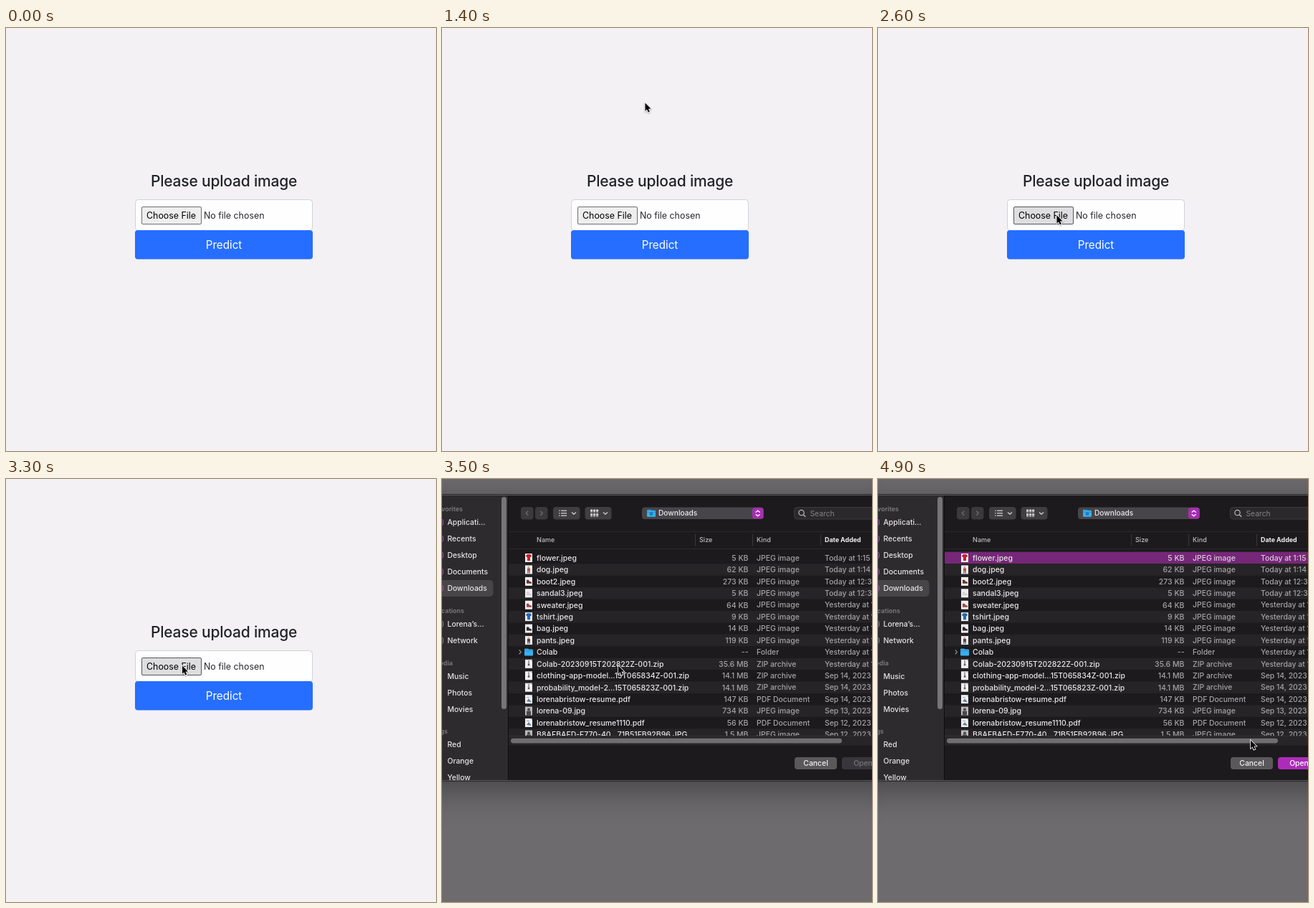
These frames come from a looping animation (600x590 px, 5000 ms). An HTML page with a canvas:

```html
<!DOCTYPE html>
<html lang="en">
<head>
<meta charset="utf-8">
<title>Upload an image</title>
<style>
  html, body { margin: 0; width: 100%; height: 100%; overflow: hidden; background: #f3f1f4; }
  canvas { display: block; width: 600px; height: 590px; }
</style>
</head>
<body>
<canvas id="stage" width="600" height="590"></canvas>
<script>
const ctx = document.getElementById('stage').getContext('2d');
const LOOP = 5000, STEP = 100;
const HOVER_AT = 2300, SHEET_AT = 3400, SETTLED_AT = 3500, SELECT_AT = 4600;
const SHEET_TOP = 22, SHEET_BOTTOM = 421;

// Cursor keys: time, x, y of the tip
const cursorPath = [
  [500, -3, 160], [750, 38, 136], [1000, 99, 117], [1200, 190, 107], [1400, 283, 104],
  [1600, 341, 121], [1800, 359, 170], [2000, 334, 232], [2200, 259, 258], [2500, 250, 261],
  [2900, 246, 260], [3100, 245.5, 260], [3800, 245.5, 260], [4100, 206, 175],
  [4400, 178, 107], [4600, 178, 107], [4750, 350, 240], [4900, 519.5, 364], [5000, 519.5, 364]
];

const files = [
  ['flower.jpeg', '5 KB', 'JPEG image', 'Today at 1:15 PM', 'shirt', '#c8202b'],
  ['dog.jpeg', '62 KB', 'JPEG image', 'Today at 1:14 PM', 'figure', '#b5533f'],
  ['boot2.jpeg', '273 KB', 'JPEG image', 'Today at 12:38 PM', 'shoe', '#6d3528'],
  ['sandal3.jpeg', '5 KB', 'JPEG image', 'Today at 12:36 PM', 'shoe', '#d4d2d5'],
  ['sweater.jpeg', '64 KB', 'JPEG image', 'Yesterday at 11:40 PM', 'shoe', '#a04a4a'],
  ['tshirt.jpeg', '9 KB', 'JPEG image', 'Yesterday at 11:38 PM', 'shirt', '#2268b4'],
  ['bag.jpeg', '14 KB', 'JPEG image', 'Yesterday at 11:36 PM', 'shoe', '#2a2830'],
  ['pants.jpeg', '119 KB', 'JPEG image', 'Yesterday at 11:34 PM', 'figure', '#50414d'],
  ['Colab', '--', 'Folder', 'Yesterday at 1:29 PM', 'folder'],
  ['Colab-20230915T202822Z-001.zip', '35.6 MB', 'ZIP archive', 'Yesterday at 1:28 PM', 'zip'],
  ['clothing-app-model…15T065834Z-001.zip', '14.1 MB', 'ZIP archive', 'Sep 14, 2023', 'zip'],
  ['probability_model-2…15T065823Z-001.zip', '14.1 MB', 'ZIP archive', 'Sep 14, 2023', 'zip'],
  ['lorenabristow-resume.pdf', '147 KB', 'PDF Document', 'Sep 14, 2023', 'pdf'],
  ['lorena-09.jpg', '734 KB', 'JPEG image', 'Sep 13, 2023', 'portrait'],
  ['lorenabristow_resume1110.pdf', '56 KB', 'PDF Document', 'Sep 12, 2023', 'pdf'],
  ['B8AFBAFD-F770-40…71B51FB92B96.JPG', '1.5 MB', 'JPEG image', 'Sep 12, 2023', 'portrait']
];

const sidebar = [
  ['Favorites', 42, 29, ['Applicati…', 'Recents', 'Desktop', 'Documents', 'Downloads']],
  ['Locations', 184, 31, ['Lorena’s…', 'Network']],
  ['Media', 256.5, 15, ['Music', 'Photos', 'Movies']],
  ['Tags', 352, 8, ['Red', 'Orange', 'Yellow', 'Green']]
];

function text(str, x, y, size, color, { weight = 500, align = 'left', tracking = 0 } = {}) {
  ctx.font = `${weight} ${size}px Inter, sans-serif`;
  ctx.letterSpacing = tracking + 'px';
  ctx.textAlign = align;
  ctx.fillStyle = color;
  ctx.fillText(str, x, y + size * 0.36);
}

function rect(x, y, w, h, color) {
  ctx.fillStyle = color;
  ctx.fillRect(x, y, w, h);
}

function box(x, y, w, h, r, fill, stroke) {
  ctx.beginPath();
  ctx.roundRect(x, y, w, h, r);
  ctx.fillStyle = fill;
  ctx.fill();
  if (stroke) {
    ctx.lineWidth = 1;
    ctx.strokeStyle = stroke;
    ctx.stroke();
  }
}

function line(points, color, width = 1) {
  ctx.beginPath();
  points.forEach(([x, y]) => ctx.lineTo(x, y));
  ctx.lineWidth = width;
  ctx.strokeStyle = color;
  ctx.stroke();
}

function shape(points, color) {
  ctx.beginPath();
  points.forEach(([x, y]) => ctx.lineTo(x, y));
  ctx.closePath();
  ctx.fillStyle = color;
  ctx.fill();
}

// Chevron centred on x, y; (dx, dy) points from the centre to the tip
function chevron(x, y, dx, dy, color, width = 1.3) {
  const sx = dy ? 3 : 0, sy = dx ? 3 : 0;
  line([[x - dx - sx, y - dy - sy], [x + dx, y + dy], [x - dx + sx, y - dy + sy]], color, width);
}

function drawPage(hover) {
  rect(0, 0, 600, 590, '#f3f1f4');
  text('Please upload image', 304, 213, 21, '#212327', { align: 'center', tracking: -0.2 });
  box(180.5, 239.5, 247, 43, 4, '#fefdff', '#d0d2d8');
  box(189.5, 249.5, 83, 24, 1.5, hover ? '#dedddf' : '#efeeef', hover ? '#565557' : '#6f6e70');
  text('Choose File', 196, 261.3, 12.4, '#000', { weight: 400 });
  text('No file chosen', 276, 261.3, 12.4, '#26282c', { weight: 400 });
  box(180, 282, 248, 40.5, 4, '#266eff');
  text('Predict', 304, 302.5, 15.2, '#fff', { weight: 400, align: 'center' });
}

function drawFolder(x, y) {
  box(x, y - 5, 6, 4, 1, '#2a9ad8');
  box(x, y - 4, 12, 9, 1.2, '#38b1ee');
  rect(x, y - 2, 12, 0.8, '#2689c5');
}

function drawIcon(kind, y, color) {
  if (kind === 'folder') {
    chevron(109, y, 1.4, 0, '#9a989b', 1.1);
    drawFolder(115, y);
    return;
  }
  rect(116, y - 6, 10, 12, kind === 'portrait' ? '#bcb9bc' : '#f1eff2');
  if (kind === 'shirt') {
    shape([[117, y - 3], [119, y - 5], [123, y - 5], [125, y - 3], [124, y - 1],
      [123, y - 1], [123, y + 4], [119, y + 4], [119, y - 1], [118, y - 1]], color);
  } else if (kind === 'figure') {
    rect(119.5, y - 4.5, 2.5, 2.5, '#d8a58c');
    rect(119, y - 2, 4, 4, color);
    rect(119.3, y + 2, 1.2, 3, '#55404a');
    rect(121.5, y + 2, 1.2, 3, '#55404a');
  } else if (kind === 'shoe') {
    shape([[118, y - 2], [121, y - 2], [122, y], [125, y + 1], [125, y + 3], [118, y + 3]], color);
  } else if (kind === 'portrait') {
    ctx.beginPath();
    ctx.arc(121, y - 2, 2, 0, 7);
    ctx.fillStyle = '#4c474b';
    ctx.fill();
    rect(118, y, 6, 6, '#4c474b');
  } else {
    shape([[123, y - 6], [126, y - 6], [126, y - 3]], '#b9b7ba');
    if (kind === 'zip') {
      rect(120.4, y - 5, 1.3, 6, '#7b797c');
      rect(119.8, y, 2.5, 2.5, '#5e5c5f');
    } else {
      rect(118, y - 3, 4, 1, '#aaa8ab');
      shape([[118, y + 3], [121, y - 1], [125, y + 4]], '#5b7fb0');
    }
  }
}

function drawSidebar(settled) {
  rect(0, SHEET_TOP, 92, SHEET_BOTTOM - SHEET_TOP, '#2d2b2e');
  box(-10, 141, 81.5, 23, 5, '#474548');
  sidebar.forEach(([title, top, right, items], group) => {
    const shift = !settled && group > 1 ? -23 : 0;
    text(title, right, top + shift, 9, '#7f7d80', { weight: 600, align: 'right' });
    items.forEach((name, i) => {
      if (name === 'Network' && !settled) return;
      const y = top + shift + 18.3 + i * 23;
      if (group < 2) box(-8, y - 4, 9.5, 8, 2, 'transparent', group ? '#8d8b8e' : '#b04bbd');
      text(name, 7.5, y, 10.4, '#e6e4e7');
    });
  });
  const top = settled ? 25 : 23, bottom = settled ? 321 : 334;
  box(83, top, 7, bottom - top, 3.5, '#767477');
  rect(92, SHEET_TOP, 1, SHEET_BOTTOM - SHEET_TOP, '#0d0c0e');
}

function drawToolbar() {
  for (const [x, dx] of [[110, -1.5], [130, 1.5]]) {
    box(x, 39, 17.5, 17.5, 4, '#3b393c');
    chevron(x + 8.7, 47.7, dx, 0, '#6d6b6e');
  }
  box(155, 39, 37.5, 17.5, 4, '#403e41');
  box(199.5, 39, 37, 17.5, 4, '#403e41');
  for (let i = 0; i < 3; i++) {
    const y = 44.2 + i * 3.4;
    rect(163, y - 0.6, 1.5, 1.3, '#cfcdd0');
    rect(166, y - 0.6, 8, 1.3, '#cfcdd0');
    for (const row of [42.5, 48.2]) {
      box(207 + i * 4, row, 3.2, 3.2, 0.6, '#cfcdd0');
      rect(207 + i * 4, row + 3.9, 3.2, 0.9, '#a3a1a4');
    }
  }
  chevron(184, 47.8, 0, 1.3, '#cfcdd0');
  chevron(228, 47.8, 0, 1.3, '#cfcdd0');

  box(279, 39.5, 170, 16.5, 4, '#474549');
  drawFolder(286, 47.8);
  box(289.5, 46, 5, 5, 2.5, '#1c7fbd');
  text('Downloads', 302, 47.7, 10.2, '#eceaed');
  box(433, 40, 15.5, 15.5, 4, '#a62eb1');
  chevron(440.7, 45.2, 0, -1.2, '#fff');
  chevron(440.7, 50.4, 0, 1.2, '#fff');

  box(491.5, 39.5, 120, 16.5, 4, '#2b292c', '#3d3b3e');
  ctx.beginPath();
  ctx.arc(501.5, 47, 3.7, 0, 7);
  ctx.lineWidth = 1.2;
  ctx.strokeStyle = '#bdbbbe';
  ctx.stroke();
  line([[504.2, 49.7], [507.3, 52.8]], '#bdbbbe', 1.3);
  text('Search', 513.5, 47.8, 10.3, '#858386', { weight: 400 });
}

function drawList(selected) {
  rect(93, 73, 507, 1, '#2b292c');
  text('Name', 132, 85, 9.1, '#bfbdc0');
  text('Size', 359, 85, 9.1, '#bfbdc0');
  text('Kind', 439, 85, 9.1, '#bfbdc0');
  text('Date Added', 534, 85, 8.9, '#f1eff2', { weight: 700 });
  for (const x of [353, 433, 528]) rect(x, 77, 1, 16, '#39373a');
  rect(93, 97, 507, 1, '#2b292c');

  ctx.save();
  ctx.beginPath();
  ctx.rect(93, 98, 507, 260);
  ctx.clip();
  files.forEach(([name, size, kind, date, icon, color], i) => {
    const y = 110 + i * 16.43, active = selected && !i;
    if (active) rect(93, y - 8.3, 507, 16.4, '#752877');
    else if (i % 2) rect(93, y - 8.2, 507, 16.43, '#262427');
    const muted = active ? '#dccade' : '#a5a3a6';
    drawIcon(icon, y, color);
    text(name, 132, y, 10.5, '#e9e7ea');
    text(size, 427.5, y, 10.5, muted, { align: 'right' });
    text(kind, 439, y, 10.4, muted);
    text(date, 534, y, 10.4, muted);
  });
  ctx.restore();

  rect(93, 358, 507, 13.5, '#272528');
  rect(93, 358, 507, 1, '#353336');
  box(96, 361.7, 462, 6.8, 3.4, '#706e71');
}

function drawSheet(settled, selected) {
  rect(0, 0, 600, 590, settled ? '#6d6b6e' : '#919092');
  ctx.save();
  ctx.translate(0, settled ? 0 : -5);
  ctx.shadowColor = 'rgba(0,0,0,.4)';
  ctx.shadowBlur = 44;
  ctx.shadowOffsetY = 12;
  rect(-60, SHEET_TOP, 720, SHEET_BOTTOM - SHEET_TOP, '#1c1a1d');
  ctx.shadowColor = 'transparent';

  ctx.save();
  ctx.beginPath();
  ctx.rect(0, SHEET_TOP, 600, SHEET_BOTTOM - SHEET_TOP);
  ctx.clip();
  drawSidebar(settled);
  drawToolbar();
  drawList(selected);
  box(492, 388, 59, 17, 4, '#5a585b');
  text('Cancel', 521.5, 396.3, 10.4, '#f1eff2', { align: 'center' });
  box(558, 388, 59, 17, 4, selected ? '#ad2bb9' : '#38363a');
  text('Open', 587.5, 396.3, 10.4, selected ? '#fff' : '#767477', { align: 'center' });
  ctx.restore();

  // Light inner edge with a dark outer outline
  rect(0, SHEET_TOP - 1, 600, 1, '#29272a');
  rect(0, SHEET_TOP, 600, 1, '#59575a');
  rect(0, SHEET_BOTTOM - 1, 600, 1, '#59575a');
  rect(0, SHEET_BOTTOM, 600, 1, '#29272a');
  ctx.restore();
}

function cursorAt(t) {
  const i = cursorPath.findIndex(key => key[0] > t);
  const [t0, x0, y0] = cursorPath[i - 1], [t1, x1, y1] = cursorPath[i];
  const k = (t - t0) / (t1 - t0);
  return [x0 + (x1 - x0) * k, y0 + (y1 - y0) * k];
}

function drawCursor(x, y) {
  ctx.save();
  ctx.translate(x, y);
  ctx.beginPath();
  for (const [px, py] of [[0.5, 0.5], [0.5, 11.7], [3, 9.4], [4.8, 13.6],
    [6.8, 12.8], [5, 8.7], [8.5, 8.5]]) ctx.lineTo(px, py);
  ctx.closePath();
  ctx.shadowColor = 'rgba(0,0,0,.35)';
  ctx.shadowBlur = 2;
  ctx.shadowOffsetY = 1;
  ctx.lineWidth = 1.6;
  ctx.strokeStyle = '#fff';
  ctx.stroke();
  ctx.shadowColor = 'transparent';
  ctx.fillStyle = '#000';
  ctx.fill();
  ctx.restore();
}

function draw(t) {
  if (t < SHEET_AT) drawPage(t >= HOVER_AT);
  else drawSheet(t >= SETTLED_AT, t >= SELECT_AT);
  if (t >= cursorPath[0][0]) drawCursor(...cursorAt(t));
}

const start = performance.now();
function tick() {
  const elapsed = (performance.now() - start) % LOOP;
  draw(Math.floor(elapsed / STEP) * STEP);
  requestAnimationFrame(tick);
}
tick();
</script>
</body>
</html>
```
